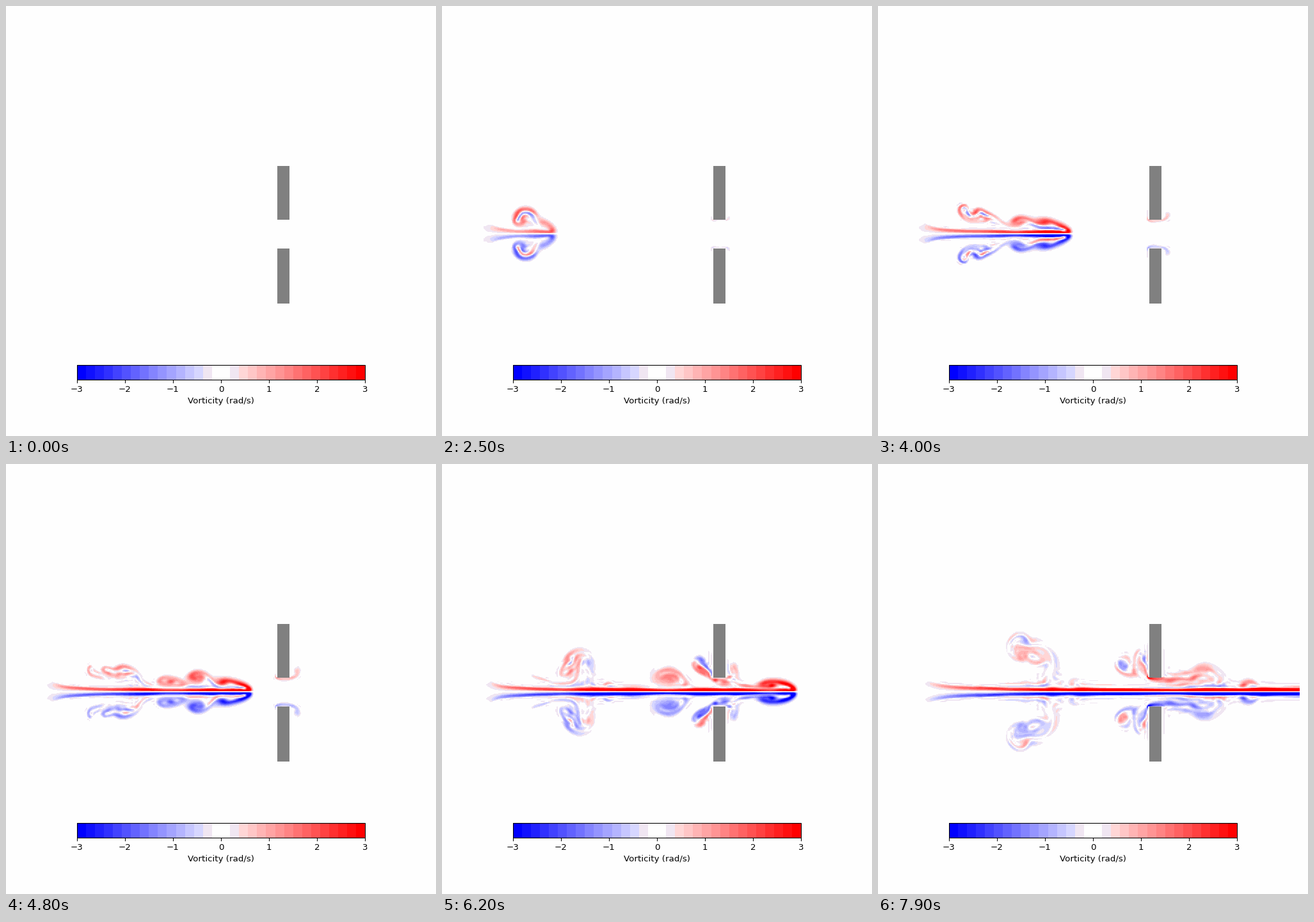
Write a matplotlib script that moves like this. It is 672 px wide and 672 px high and loops after 8000 ms.

```python
"""A buoyant plume is blown through a slit; its vorticity is shown over time."""
import numpy as np
import matplotlib.pyplot as plt
from matplotlib.animation import FuncAnimation
from matplotlib.cm import ScalarMappable
from matplotlib.colors import ListedColormap, Normalize
from matplotlib.patches import Rectangle

SIZE, DPI = 672, 96
FRAMES, INTERVAL = 80, 100
X0, Y0, CELL = 13.44, 249.9, 2.1504      # picture of the field, in pixels
COLS, ROWS = 300, 100                    # visible cells
NX, HALF = 400, ROWS // 2                # simulated cells, rows above the axis
SOURCE_X, SOURCE_R = 70, 16              # plume source, in pixels
PAPER = "#fefefe"

# The flow mirrors at the axis, so only heights 0..HALF are kept.
height, col = np.mgrid[0:HALF + 1, 0:NX].astype(float)
solid = (height >= 11) & (col >= 190) & (col <= 200)
fluid = ~solid
reach = np.hypot(col + 0.5 - (SOURCE_X - X0) / CELL, height)
source = np.clip(SOURCE_R / CELL - reach + 0.5, 0, 1)

kx = 2 * np.pi * np.fft.rfftfreq(NX)[None, :]
ky = 2 * np.pi * np.fft.fftfreq(ROWS)[:, None]
k2 = kx**2 + ky**2
k2[0, 0] = 1
damping = np.exp(-2 * (np.sqrt(k2) / np.pi)**12)


def unfold(f, sign):
    return np.vstack([f, sign * f[HALF - 1:0:-1]])


def project(u, v):
    """Remove the divergence and keep the wall at rest."""
    fu, fv = np.fft.rfft2(unfold(u, 1)), np.fft.rfft2(unfold(v, -1))
    div = (kx * fu + ky * fv) / k2
    u, v = (np.fft.irfft2((f - k * div) * damping, (ROWS, NX))[:HALF + 1]
            for f, k in ((fu, kx), (fv, ky)))
    return u * fluid, v * fluid


def sample(q, dx, dy):
    """Bilinear values of the stacked fields at shifted places, with bounds."""
    x = (col + dx) % NX
    y = np.clip(height + dy, 0, HALF)
    i = x.astype(int)
    j = np.minimum(y.astype(int), HALF - 1)
    fx, fy = x - i, y - j
    left, right = j * NX + i % NX, j * NX + (i + 1) % NX
    flat = q.reshape(len(q), -1)
    a, b, c, d = (np.take(flat, n, axis=1)
                  for n in (left, right, left + NX, right + NX))
    value = (a + (b - a) * fx) * (1 - fy) + (c + (d - c) * fx) * fy
    low = np.minimum(np.minimum(a, b), np.minimum(c, d))
    high = np.maximum(np.maximum(a, b), np.maximum(c, d))
    return value, low, high


def step(q, dt):
    """MacCormack advection, buoyancy to the right, then projection."""
    dx, dy = q[0] * dt, q[1] * dt
    ahead, low, high = sample(q, -dx, -dy)
    back = sample(ahead, dx, dy)[0]
    u, v, smoke = np.clip(ahead + 0.5 * (q - back), low, high)
    smoke = (smoke + dt * source) * fluid
    u, v = project((u + dt * smoke) * fluid, v * fluid)
    return np.stack([u, v, smoke])


def curl(u, v):
    dv = (np.roll(v, -1, 1) - np.roll(v, 1, 1)) / 2
    full = unfold(u, 1)
    du = (np.roll(full, -1, 0) - np.roll(full, 1, 0))[:HALF + 1] / 2
    return ((dv - du) * fluid)[:, :COLS].astype(np.float32)


def plume_tip(smoke):
    near_axis = smoke[:12].max(0) > 0.1 * smoke.max()
    return X0 + (np.flatnonzero(near_axis).max() + 0.5) * CELL


def front(t):
    """Place of the jet front, in pixels, after t seconds."""
    return 84 + 149 * (t / 3.2)**1.74


def simulate(last_tip, max_steps=950):
    q = np.zeros((3, HALF + 1, NX))
    clock, tip = 0.0, 0.0
    clocks, tips, fields = [], [], []
    while tip < last_tip and len(clocks) < max_steps:
        speed = np.abs(q[:2]).max()
        dt = min(0.12, 1.2 / (speed + 1e-9))
        q = step(q, dt)
        clock += dt
        tip = max(tip, plume_tip(q[2]))
        clocks.append(clock)
        tips.append(tip)
        fields.append(curl(q[0], q[1]))
    return clocks, tips, fields


clocks, tips, fields = simulate(front(FRAMES * INTERVAL / 1000))


def flow_at(t):
    """Upper half of the field when the front stands where it should."""
    start = min(t, 1.0)
    clock = np.interp(front(max(t, 1.0)), tips, clocks) * start
    n = np.interp(clock, clocks, np.arange(len(clocks)))
    i = min(int(n), len(fields) - 2)
    return fields[i] + (n - i) * (fields[i + 1] - fields[i])


gain = 2.7 / flow_at(3.2)[:, :180].max()


def vorticity(frame):
    half = gain * flow_at(frame * INTERVAL / 1000)
    if frame < 2:
        half = 0 * half
    return np.vstack([half[HALF - 1::-1], -half[1:]])


def make_cmap():
    colors = plt.get_cmap("bwr")(np.linspace(0, 1, 32))
    colors[15:17, :3] = 254 / 255
    colors[[14, 17], :3] = np.array([240, 230, 242]) / 255
    return ListedColormap(colors)


fig = plt.figure(figsize=(SIZE / DPI, SIZE / DPI), dpi=DPI, facecolor=PAPER)
ax = fig.add_axes([0, 0, 1, 1])
ax.axis("off")
cmap, norm = make_cmap(), Normalize(-3, 3)
image = ax.imshow(vorticity(0), cmap=cmap, norm=norm, aspect="auto",
                  extent=(X0, X0 + COLS * CELL, Y0 + ROWS * CELL, Y0))
ax.set_xlim(0, SIZE)
ax.set_ylim(SIZE, 0)
for top, tall in ((250, 83.5), (379, 86)):
    ax.add_patch(Rectangle((424, top), 19, tall, color="#808080", lw=0,
                           zorder=3))

cax = fig.add_axes([110.6 / SIZE, 88.2 / SIZE, 450.8 / SIZE, 22.4 / SIZE])
fig.colorbar(ScalarMappable(norm, cmap), cax=cax, orientation="horizontal",
             label="Vorticity (rad/s)")


def update(frame):
    image.set_data(vorticity(frame))
    return [image]


anim = FuncAnimation(fig, update, frames=FRAMES, interval=INTERVAL,
                     repeat=True, repeat_delay=0)
plt.show()
```
